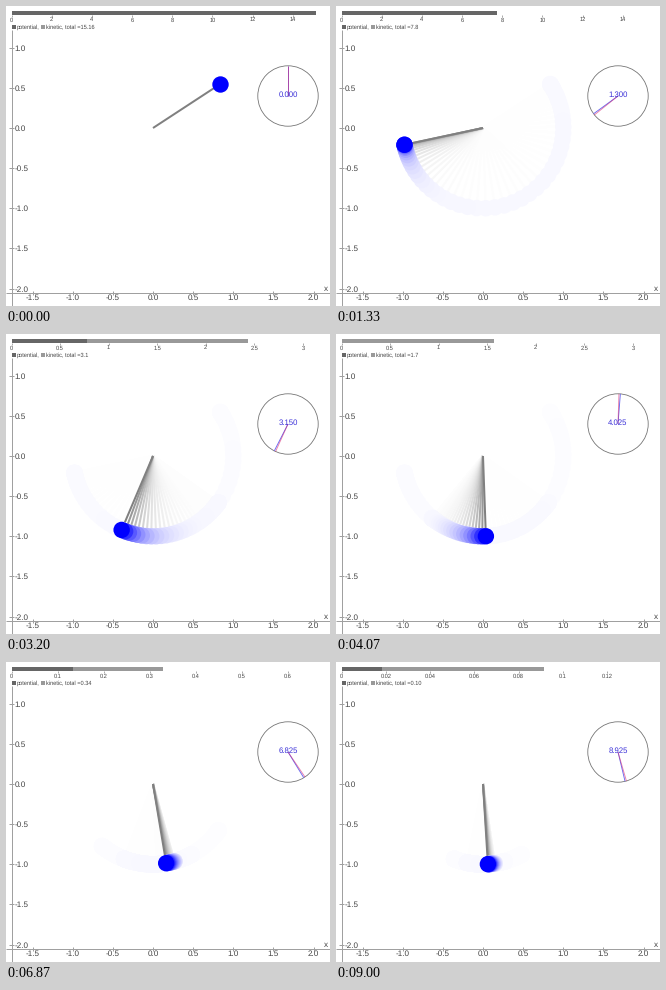
Animation of 324x300 px, one loop 9.07 s. Source, as a matplotlib script:

```python
import numpy as np
import matplotlib.pyplot as plt
from matplotlib.animation import FuncAnimation
from matplotlib.collections import LineCollection
from matplotlib.patches import Circle, Rectangle

W, H, DPI = 324, 300, 100
POSES, LOOP = 136, 9070
FRAMES = 2 * POSES
PX = 72 / DPI

# Damped pendulum: unit mass and length
G, DAMP, STEP = 9.8, 0.6, 0.025
START = 2.15
UNIT, OX, OY = 80.3, 147, 122
BALL = 8.2

# Bar scales: full-width energy, tick spacing
SCALES = [(15.16, 2), (3.135, 0.5), (0.6605, 0.1), (0.1375, 0.02)]
BAR_X, BAR_W = 5.5, 304.5
CX, CY, CR = 282, 90, 30.2
DARK, LIGHT, AXIS, INK = "#666666", "#999999", "#a0a0a0", "#444444"

plt.rcParams["font.family"] = "Liberation Sans"
plt.rcParams["text.hinting"] = "none"


def slope(s):
    return np.array([s[1], -G * np.sin(s[0]) - DAMP * s[1]])


def simulate(n):
    s = np.array([START, 0.0])
    out = [s]
    for _ in range(n):
        a = slope(s)
        b = slope(s + STEP / 2 * a)
        c = slope(s + STEP / 2 * b)
        d = slope(s + STEP * c)
        s = s + STEP / 6 * (a + 2 * b + 2 * c + d)
        out.append(s)
    return np.array(out)


path = simulate(380)
theta, omega = path.T
potential = G * (1 - np.cos(theta))
total = potential + omega ** 2 / 2
bobs = np.column_stack([OX + UNIT * np.sin(theta), OY + UNIT * np.cos(theta)])
rods = np.stack([np.full_like(bobs, (OX, OY)), bobs], axis=1)


def clock_time(pose):
    # The simulation clock runs slightly behind playback
    return np.interp(pose, [0, 20, 35, 61, 80, 103, 135],
                     [0, 1.3, 2.275, 4.025, 5.275, 6.825, 8.925])


fig = plt.figure(figsize=(W / DPI, H / DPI), dpi=DPI, facecolor="white")
ax = fig.add_axes([0, 0, 1, 1])
ax.set_xlim(0, W)
ax.set_ylim(H, 0)
ax.axis("off")


def line(xs, ys, color, width, z):
    return ax.plot(xs, ys, color=color, lw=width * PX, zorder=z,
                   solid_capstyle="butt")[0]


def label(x, y, text, size, color=INK, ha="center", z=6):
    return ax.text(x, y, text, fontsize=size * PX, color=color, ha=ha,
                   va="center_baseline", zorder=z)


def box(x, y, w, h, color):
    return ax.add_patch(Rectangle((x, y), w, h, fc=color, ec="none", zorder=5))


# Axes
line([5.5, 5.5], [24, H], AXIS, 1, 4)
line([0, W], [287, 287], AXIS, 1, 4)
for k in range(-4, 3):
    y = OY - k * UNIT / 2
    line([3, 7.5], [y, y], AXIS, 1, 4)
    label(8.7, y, f"{k / 2:.1f}", 8.1, ha="left")
for k in range(-3, 5):
    x = OX + k * UNIT / 2
    line([x, x], [285, 289], AXIS, 1, 4)
    label(x, 290.6, f"{k / 2:.1f}", 8.1)
label(319.5, 282, "x", 8.1)

# Pendulum with its fading trail
rod_set = LineCollection([], linewidths=2 * PX, zorder=2)
ax.add_collection(rod_set)
bob_set = ax.scatter([], [], s=(2 * BALL * PX) ** 2, linewidths=0, zorder=3)

# Clock
ax.add_patch(Circle((CX, CY), CR, fc="none", ec="#707070", lw=0.8 * PX, zorder=4))
sim_hand = line([], [], "#6a6af0", 0.9, 5)
real_hand = line([], [], (0.85, 0.1, 0.4, 0.55), 0.9, 5)
clock_text = label(CX, 88, "", 7.8, "#3a30d8", z=7)

# Energy bar
bar_dark = box(BAR_X, 5, 0, 4, DARK)
bar_light = box(BAR_X, 5, 0, 4, LIGHT)
marks = [line([], [], "#888888", 0.7, 5) for _ in range(8)]
mark_texts = [label(0, 13.3, "", 5.6) for _ in range(8)]
box(6, 18.7, 4, 4, DARK)
box(35, 18.7, 4, 4, LIGHT)
label(10.8, 21, "potential,", 5.6, ha="left")
energy_text = label(40, 21, "", 5.6, ha="left")


def set_hand(hand, t):
    a = np.pi * t
    hand.set_data([CX, CX + CR * np.sin(a)], [CY, CY - CR * np.cos(a)])


def trail(n, rgb, stain):
    """Past steps still visible, and their colours faded towards white."""
    age = np.arange(n, -1, -1)
    weight = np.maximum(0.81 ** age, stain * np.exp(-age * STEP / 3))
    keep = np.flatnonzero(weight > 0.008)
    return keep, 1 - weight[keep, None] * (1 - np.array(rgb))


def draw_pendulum(n):
    keep, colors = trail(n, (0.5, 0.5, 0.5), 0.015)
    rod_set.set_segments(rods[keep])
    rod_set.set_color(colors)
    keep, colors = trail(n, (0, 0, 1), 0.035)
    bob_set.set_offsets(bobs[keep])
    bob_set.set_facecolor(colors)


def draw_bar(n):
    level = sum(total[n] < full for full, _ in SCALES[1:])
    full, gap = SCALES[level]
    scale = BAR_W / full
    bar_dark.set_width(potential[n] * scale)
    bar_light.set_x(BAR_X + potential[n] * scale)
    bar_light.set_width((total[n] - potential[n]) * scale)
    for k, (mark, text) in enumerate(zip(marks, mark_texts)):
        shown = k * gap <= full
        x = BAR_X + k * gap * scale
        mark.set_data([x, x], [9, 11])
        mark.set_visible(shown)
        text.set_x(x)
        text.set_text(f"{k * gap:g}" if shown else "")

    # The number is refreshed only every 0.35 s
    held = max(0, (n - 5) // 14 * 14 + 5)
    value = total[held]
    digits = 2 if value > 15 or value < 0.5 else 1
    energy_text.set_text(f"kinetic, total ={value:.{digits}f}")


def update(i):
    # Each pose is held for two frames, centred on its moment
    real = clock_time(min((i + 1) // 2, POSES - 1))
    n = int(round(real / STEP))
    draw_pendulum(n)
    draw_bar(n)
    set_hand(sim_hand, n * STEP)
    set_hand(real_hand, max(0, real - 0.015))
    clock_text.set_text(f"{n * STEP:.3f}")
    return []


anim = FuncAnimation(fig, update, frames=FRAMES, init_func=lambda: update(0),
                     interval=LOOP / FRAMES, repeat=True, repeat_delay=0,
                     blit=False)
plt.show()
```
